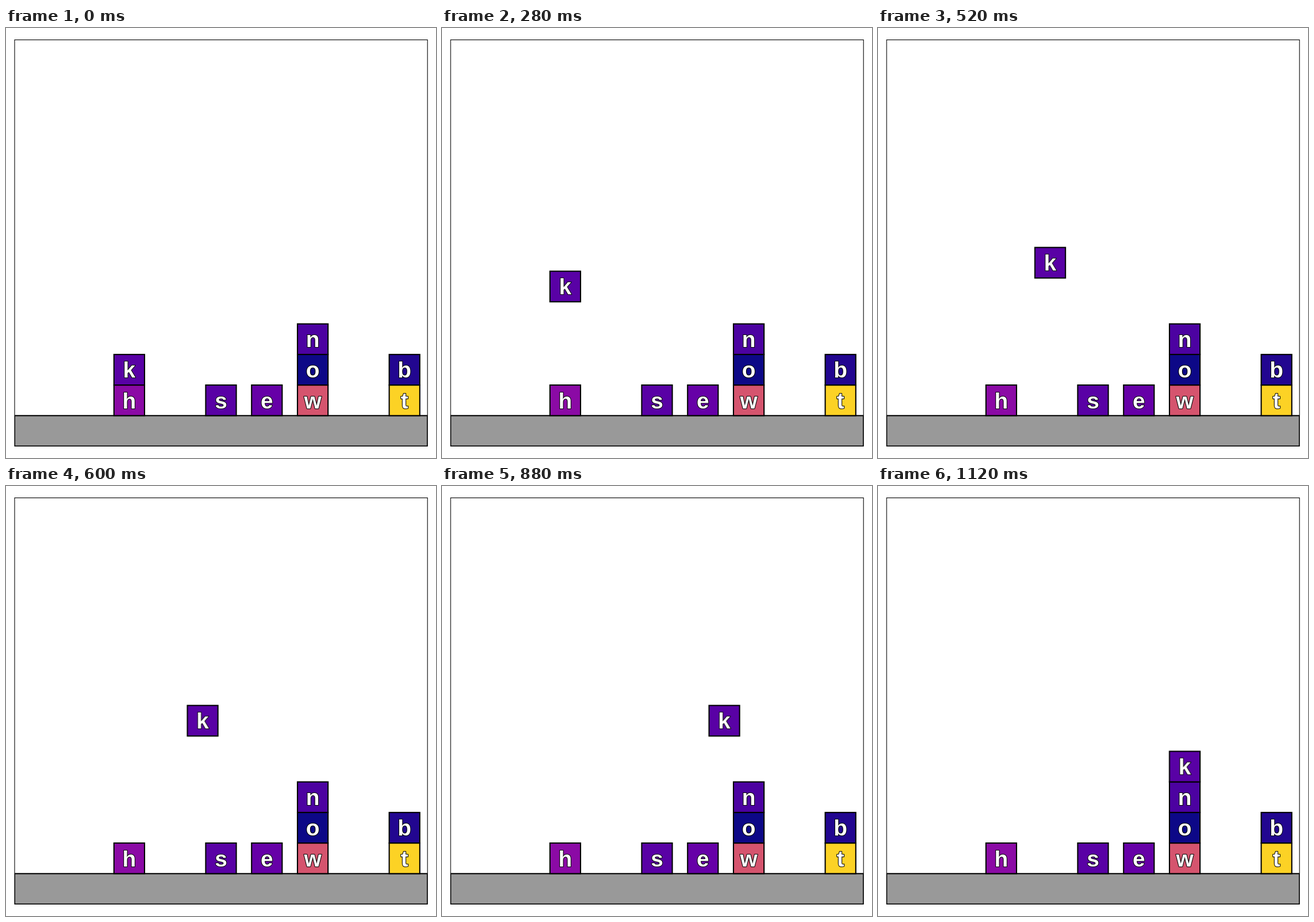
Write an HTML page that moves like this. It is 748 px wide and 748 px high and loops after 1.16 s.

```html
<!DOCTYPE html>
<html lang="en">
<head>
<meta charset="utf-8">
<title>Stacking blocks</title>
<style>
  html, body { margin: 0; width: 100%; height: 100%; overflow: hidden; background: #fff; }
  svg { display: block; width: 748px; height: 748px; }
  rect { stroke: #000; stroke-width: 2.08px; }
  .frame { fill: none; stroke-width: 1.1px; }
  text {
    font: bold 38.9px "Liberation Sans", Arial, sans-serif;
    text-anchor: middle;
    fill: #fff; stroke: #000; stroke-width: 2.08px; stroke-linejoin: round;
    paint-order: stroke;
  }
  .mover { animation: carry 1160ms infinite; }
  /* lift 9 steps, slide 15, lower 4, then hold one step */
  @keyframes carry {
    0%      { transform: translate(0, 0); animation-timing-function: steps(9, end); }
    31.034% { transform: translate(0, -186.2px); animation-timing-function: steps(15, end); }
    82.758% { transform: translate(319.2px, -186.2px); animation-timing-function: steps(4, end); }
    96.551%, 100% { transform: translate(319.2px, -106.4px); }
  }
</style>
</head>
<body>
<svg id="stage" viewBox="0 0 748 748">
  <clipPath id="area"><path d="M15 20.6H733.2V727.4H15Z"/></clipPath>
  <g clip-path="url(#area)">
    <rect x="15" y="674.3" width="718.2" height="53.2" fill="#999"/>
    <g id="blocks"></g>
  </g>
  <rect class="frame" x="15" y="20.6" width="718.2" height="706.8"/>
</svg>
<script>
  const UNIT = 53.2, LEFT = 187.8, FLOOR = 674.3;

  // letter, column, level, colour
  const blocks = [
    ["h", 0, 0, "#8b0aa5"],
    ["s", 2, 0, "#5901a5"],
    ["e", 3, 0, "#6600a7"],
    ["w", 4, 0, "#d5546e"],
    ["o", 4, 1, "#0d0887"],
    ["n", 4, 2, "#4c02a1"],
    ["t", 6, 0, "#fcd225"],
    ["b", 6, 1, "#220690"],
    ["k", 0, 1, "#5901a5"]
  ];

  function block([letter, column, level, colour]) {
    const x = LEFT + column * UNIT * 1.5;
    const y = FLOOR - (level + 1) * UNIT;
    return `<g${letter === "k" ? ' class="mover"' : ""}>
      <rect x="${x}" y="${y}" width="${UNIT}" height="${UNIT}" fill="${colour}"/>
      <text x="${x + UNIT / 2}" y="${y + UNIT / 2 + 13.9}">${letter}</text>
    </g>`;
  }

  document.getElementById("blocks").innerHTML = blocks.map(block).join("");
</script>
</body>
</html>
```
